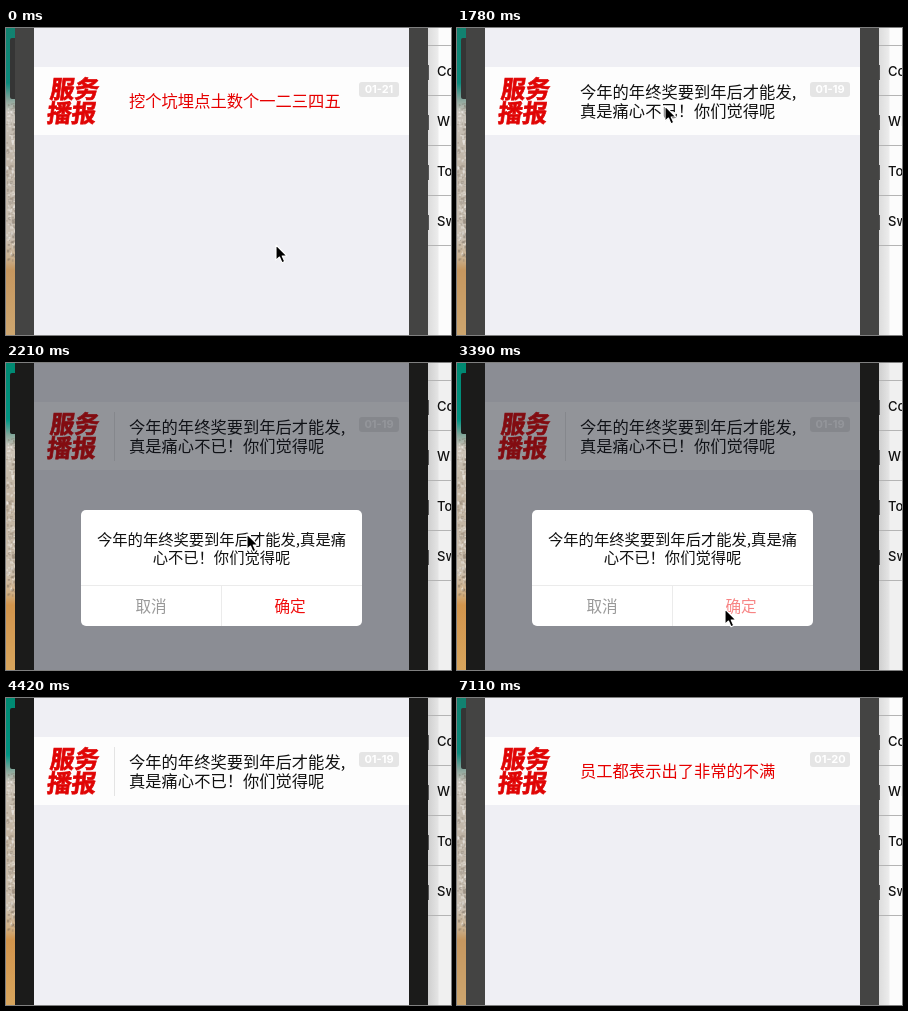
Animation, 445 px wide and 307 px high, one loop 7150 ms. Source, as an HTML page with a canvas:

```html
<!DOCTYPE html>
<html lang="zh-CN">
<head>
<meta charset="utf-8">
<title>Notice ticker</title>
<style>
  html, body { margin: 0; width: 100%; height: 100%; overflow: hidden; }
  body { position: relative; background: #f9f9f9; font-family: "Noto Sans CJK SC", "Noto Sans CJK JP", "Noto Sans", sans-serif; }
  div { position: absolute; box-sizing: border-box; white-space: nowrap; }
  #stage { left: 0; top: 0; width: 445px; height: 307px; overflow: hidden; }

  #beach { position: absolute; left: 0; top: 0;
    background: linear-gradient(#12816f 0, #0b8a7c 55px, #8aa59b 72px, #c9c3ba 84px, #bfb4a6 135px, #c9bfb2 210px, #c9b08f 230px, #c6975f 242px, #cda66f 307px); }
  .active #beach { filter: saturate(1.3); }
  #side { left: 422px; top: 0; width: 23px; height: 307px; background: linear-gradient(90deg, #dcdcdc, #ececec 10px, #fcfcfc 11px); }
  .active #side { background: linear-gradient(90deg, #cfcfcf, #e4e4e4 10px, #f0f0f0 11px); }
  .rule { left: 0; width: 23px; height: 1px; background: #b4b4b4; }
  .mark { left: 0; width: 1px; height: 15px; background: #555; }
  .item { left: 9px; height: 20px; font: 500 13px/20px Inter, "Liberation Sans", sans-serif; color: #111; }

  .bezel { top: 0; width: 19px; height: 307px; background: #444443; }
  #key { left: 4px; top: 10px; width: 5px; height: 61px; background: #353535; border-radius: 2px 0 0 2px; }
  .active .bezel, .active #key { background: #1b1b1a; }

  #screen { left: 28px; top: 0; width: 375px; height: 307px; background: #efeff4; overflow: hidden; }
  #card { left: 0; top: 39px; width: 375px; height: 68px; background: #fdfdfd; overflow: hidden; }
  #title { left: 15px; top: 9px; font-size: 24.5px; line-height: 24px; font-weight: 900; color: #e00505;
    -webkit-text-stroke: .7px #e00505; transform: skewX(-7deg); }
  #bar { left: 80px; top: 10px; width: 1px; height: 49px; background: #e4e4e4; visibility: hidden; }
  .active #bar { visibility: visible; }
  .page { left: 0; width: 375px; height: 68px; }
  .text { left: 95px; top: 33.5px; transform: translateY(-50%); font-size: 16.3px; line-height: 19.4px; }
  .badge { left: 325px; top: 15px; width: 40px; height: 15px; border-radius: 3px; background: #e5e5e5; color: #fff;
    font: 700 11px/15px Inter, "Liberation Sans", sans-serif; text-align: center; }

  #dim { left: 0; top: 0; width: 375px; height: 307px; background: rgba(17,21,33,.45); }
  #box { left: 47px; top: 147px; width: 281px; height: 116px; border-radius: 5px; background: #fff; }
  #msg { left: 0; top: 19px; width: 281px; text-align: center; font-size: 15.3px; line-height: 18px; color: #111; }
  .btn { top: 75px; width: 141px; height: 41px; border-top: 1px solid #ebebeb; text-align: center; font-size: 15.6px; line-height: 38px; }
  #no { left: 0; color: #999; border-right: 1px solid #ebebeb; }
  #yes { left: 141px; width: 140px; color: #f00c0c; padding-right: 4px; }
  #cursor { position: absolute; left: 0; top: 0; overflow: visible; }
</style>
</head>
<body>
<div id="stage">
  <canvas id="beach" width="9" height="307"></canvas>
  <div id="side"></div>
  <div id="key"></div>
  <div class="bezel" style="left:9px"></div>
  <div class="bezel" style="left:403px"></div>
  <div id="screen">
    <div id="card">
      <div id="pages"></div>
      <div id="title">服务<br>播报</div>
      <div id="bar"></div>
    </div>
    <div id="dim"></div>
    <div id="box">
      <div id="msg">今年的年终奖要到年后才能发,真是痛<br>心不已！你们觉得呢</div>
      <div class="btn" id="no">取消</div>
      <div class="btn" id="yes"><span id="ok">确定</span></div>
    </div>
  </div>
  <svg id="cursor" width="14" height="20">
    <path d="M0 0V15.2L3.5 12L6 17.7L8.7 16.5L6.2 11H11Z" fill="#000" stroke="#fff" stroke-width="1.1" stroke-linejoin="round"/>
  </svg>
</div>
<script>
const $ = id => document.getElementById(id);
const LOOP = 7150, PAGE = 68;

function add(parent, cls, html = '', top) {
  const el = document.createElement('div');
  el.className = cls;
  if (top !== undefined) el.style.top = top + 'px';
  el.innerHTML = html;
  parent.append(el);
  return el;
}

['Co', 'Wh', 'To', 'Sw'].forEach((word, i) => {
  add($('side'), 'mark', '', 37 + i * 50);
  add($('side'), 'item', word, 33 + i * 50);
});
for (let y = 17; y < 220; y += 50) add($('side'), 'rule', '', y);

[
  ['01-21', '挖个坑埋点土数个一二三四五', '#e60000'],
  ['01-19', '今年的年终奖要到年后才能发,<br>真是痛心不已！你们觉得呢', '#111'],
  ['01-20', '员工都表示出了非常的不满', '#e60000']
].forEach(([date, text, color], i) => {
  const page = add($('pages'), 'page', '', i * PAGE);
  add(page, 'text', text).style.color = color;
  add(page, 'badge', date);
});

// Pebbles and foam on the strip of beach
let seed = 7;
const random = () => (seed = seed * 16807 % 2147483647) / 2147483647;
const ctx = $('beach').getContext('2d');
for (let i = 0; i < 240; i++) {
  ctx.fillStyle = random() < .5 ? 'rgba(255,255,255,.3)' : 'rgba(110,95,85,.25)';
  ctx.fillRect(random() * 9, 75 + random() * 160, 1 + random() * 2, 1 + random() * 2);
}

const mix = (a, b, p) => a + (b - a) * p;
const easeOut = p => 1 - (1 - p) ** 2;
const easeInOut = p => p < .5 ? 4 * p ** 3 : 1 - 4 * (1 - p) ** 3;

// Progress in n equal jumps, the first at `from` and the last at `to`
function jumps(t, from, to, n) {
  if (t < from) return 0;
  return Math.min(1, (1 + Math.floor((t - from) / (to - from) * (n - 1) + .01)) / n);
}

function pointer(t) {
  const rest = [270, 217], row = [208, 78], button = [268, 246], gone = [400, 320];
  const leg = (a, b, p) => a.map((v, i) => mix(v, b[i], p));
  if (t < 2060) return leg(rest, row, easeInOut(jumps(t, 1190, 1630, 4)));
  if (t < 3830) return leg(row, button, easeOut(jumps(t, 2060, 2800, 6)));
  return leg(button, gone, jumps(t, 3830, 4420, 5));
}

function draw(t) {
  const turns = easeInOut(jumps(t, 1040, 1480, 4)) + easeInOut(jumps(t, 5910, 6360, 4));
  const show = jumps(t, 1920, 2210, 3), hide = jumps(t, 3540, 3830, 3);
  const fade = Math.min(1, show * 1.5) * (1 - hide ** 1.4);
  const [x, y] = pointer(t).map(Math.round);

  $('stage').classList.toggle('active', t >= 1920 && t < 7110);
  $('pages').style.transform = `translateY(${-Math.round(turns * PAGE)}px)`;
  $('dim').style.opacity = $('box').style.opacity = fade;
  $('box').style.transform = show < 1 ? `scale(${1 + .25 * (1 - show) ** 2})` : 'none';
  $('ok').style.opacity = t < 3390 ? 1 : .5;
  $('cursor').style.transform = `translate(${x}px, ${y}px)`;
}

const start = performance.now();
function tick() {
  draw((performance.now() - start) % LOOP);
  requestAnimationFrame(tick);
}
tick();
</script>
</body>
</html>
```
